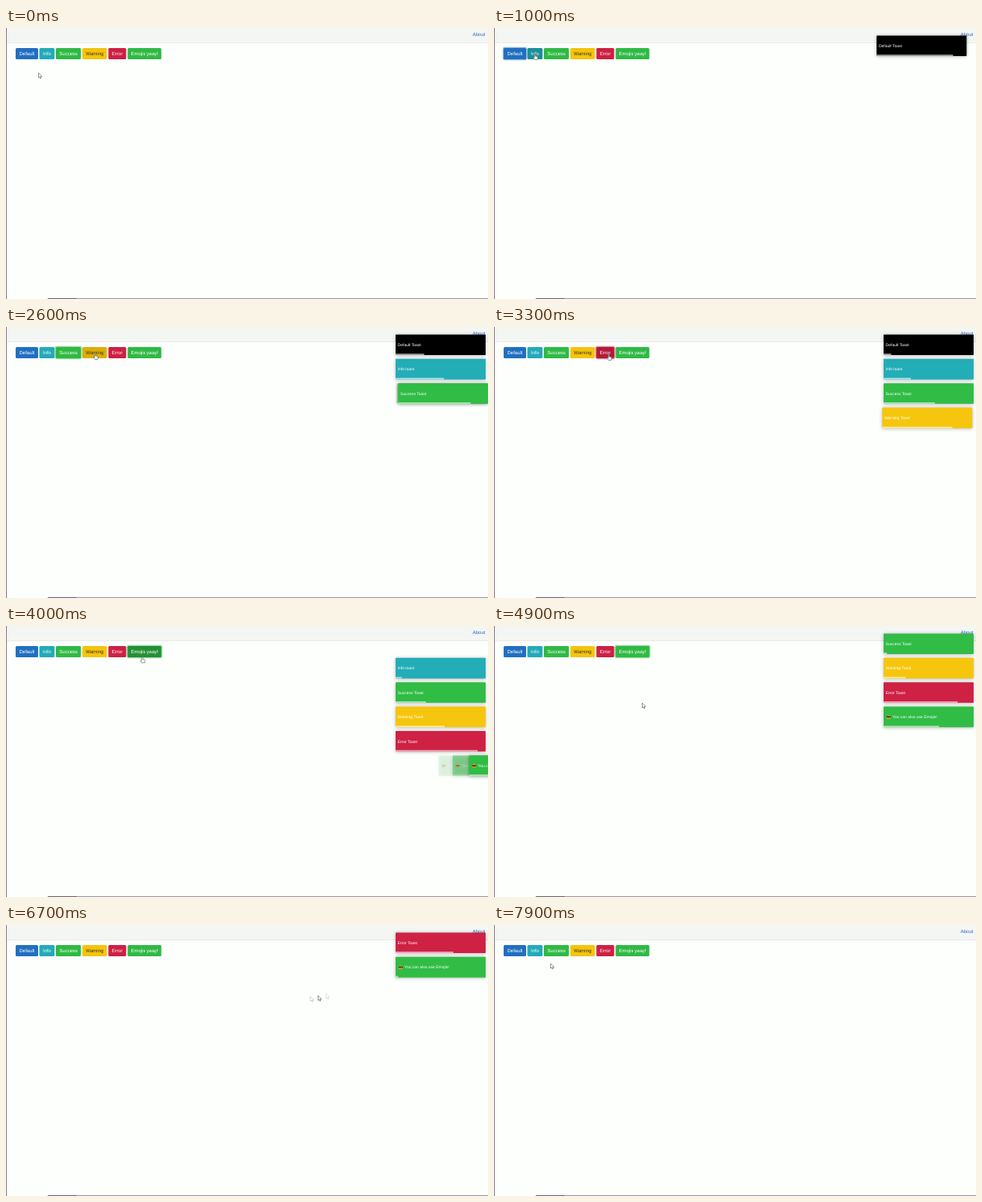
These frames come from a looping animation (600x338 px, 8 s). An HTML page with a canvas:

```html
<!DOCTYPE html>
<html lang="en">
<head>
<meta charset="utf-8">
<title>Toast demo</title>
<style>
  html, body { margin: 0; width: 100%; height: 100%; overflow: hidden; background: #fdfffd; }
  canvas { display: block; width: 600px; height: 338px; }
</style>
</head>
<body>
<canvas id="stage"></canvas>
<script>
const W = 600, H = 338, LOOP = 8000, STEP = 100;
const canvas = document.getElementById('stage');
const ctx = canvas.getContext('2d');
const dpr = window.devicePixelRatio || 1;
canvas.width = W * dpr;
canvas.height = H * dpr;

const FONT = '"Liberation Sans", Arial, sans-serif';
const ZOOM = 0.35;      // page pixels to stage pixels
const ANIM = 750;       // length of the bounce animations
const REMOVE = 550;     // delay before a closed toast frees its slot
const BLUR = 15;        // spacing of the blended exposures

const buttons = [
  { label: 'Default', x: 12, w: 28, color: '#216fc1', hover: '#1c5ea5', ring: '33,111,193' },
  { label: 'Info', x: 41.5, w: 19, color: '#23aab8', hover: '#1c8e9a', ring: '35,170,184' },
  { label: 'Success', x: 62, w: 31.3, color: '#30b944', hover: '#249036', ring: '48,185,68' },
  { label: 'Warning', x: 95, w: 30.6, color: '#f4c40c', hover: '#dcae08', ring: '244,196,12', ink: '#3b330f' },
  { label: 'Error', x: 127.4, w: 22.2, color: '#cd2044', hover: '#b31a3a', ring: '205,32,68' },
  { label: 'Emojis yaay!', x: 151.4, w: 42, color: '#30b944', hover: '#249036', ring: '48,185,68' }
];

// life = length of the progress bar, end = when the toast closes
const toasts = [
  { text: 'Default Toast', color: '#000', start: 550, life: 3000 },
  { text: 'Info toast', color: '#23adb7', start: 1210, life: 3000 },
  { text: 'Success Toast', color: '#30bc45', start: 2010, life: 3000 },
  { text: 'Warning Toast', color: '#f5c60d', start: 2635, life: 3000 },
  { text: 'Error Toast', color: '#ce2144', start: 3120, life: 10000, end: 7350 },
  { text: 'You can also use Emojis!', color: '#30bc45', start: 3725, life: 3065, face: true }
];
for (const toast of toasts) toast.end = toast.end || toast.start + toast.life;
const BLUR_CLICK = 5900;

// pointer path: time, x, y
const path = [
  [0, 40.5, 56], [350, 27, 33], [600, 27, 33], [1000, 51, 32], [1300, 51, 32],
  [1700, 76, 31], [2100, 76, 31], [2450, 111, 33], [2700, 111, 33], [3000, 143, 34],
  [3350, 143, 34], [3650, 169.5, 38.5], [4150, 169.5, 38.5], [4700, 184.5, 96], [6350, 184.5, 96],
  [6550, 290, 95], [6700, 388.5, 88], [6800, 450, 58], [7100, 541, 21],
  [7350, 541, 21], [7600, 320, 132], [7900, 70.5, 48], [8000, 70.5, 48]
];

const clamp = (v, a, b) => Math.min(b, Math.max(a, v));
const easeOut = p => 1 - Math.pow(1 - p, 3);

function slope(i, axis) {
  const a = path[i - 1], b = path[i], c = path[i + 1];
  if (!a || !c) return 0;
  const before = (b[axis] - a[axis]) / (b[0] - a[0]);
  const after = (c[axis] - b[axis]) / (c[0] - b[0]);
  return before * after > 0 ? 2 * before * after / (before + after) : 0;
}

function pointerAt(t) {
  t = clamp(t, 0, LOOP - 1);
  const i = path.findIndex(k => k[0] > t) - 1;
  const a = path[i], b = path[i + 1], span = b[0] - a[0];
  const p = (t - a[0]) / span, q = 1 - p;
  const along = axis =>
    a[axis] * (1 + 2 * p) * q * q + b[axis] * (3 - 2 * p) * p * p +
    span * p * q * (q * slope(i, axis) - p * slope(i + 1, axis));
  return { x: along(1), y: along(2) };
}

function segment(keys, p) {
  const i = Math.max(1, keys.findIndex(k => k[0] >= p));
  const [p0, v0] = keys[i - 1], [p1, v1] = keys[i];
  return v0 + (v1 - v0) * easeOut((p - p0) / (p1 - p0));
}

const BOUNCE_IN = [[0, 3000], [0.6, -25], [0.75, 10], [0.9, -5], [1, 0]];
const BOUNCE_OUT = [[0, 0], [0.2, -20], [1, 2000]];

function shift(toast, t) {
  const leaving = t >= toast.end;
  const p = clamp((t - (leaving ? toast.end : toast.start)) / ANIM, 0, 1);
  return segment(leaving ? BOUNCE_OUT : BOUNCE_IN, p) * ZOOM;
}

function box(x, y, w, h, r, fill) {
  ctx.fillStyle = fill;
  ctx.beginPath();
  ctx.roundRect(x, y, w, h, r);
  ctx.fill();
}

function write(text, x, y, size, color, align = 'left') {
  ctx.font = `${size}px ${FONT}`;
  ctx.textRendering = 'geometricPrecision';
  ctx.textAlign = align;
  ctx.textBaseline = 'alphabetic';
  ctx.fillStyle = color;
  ctx.fillText(text, x, y);
}

function drawPage() {
  box(0, 0, W, H, 0, '#fdfffd');
  box(0, 0, W, 18, 0, '#f4f6f4');
  box(0, 18, W, 0.8, 0, '#e2e4e2');
  write('About', 580.7, 10.3, 6, '#2a68c4');
  box(0, 0, 1, H, 0, '#857b8f');
  box(52, 337, W - 52, 1, 0, '#9d95a5');
  box(52, 337, 36, 1, 0, '#6c6078');
}

const inside = (p, x, y, w, h) => p.x >= x && p.x <= x + w && p.y >= y && p.y <= y + h;

function drawButton(b, hovered, focused) {
  if (focused) box(b.x - 1.2, 23.8, b.w + 2.4, 16.4, 2.4, `rgba(${b.ring},.5)`);
  box(b.x, 25, b.w, 14, 1.5, hovered ? b.hover : b.color);
  write(b.label, b.x + b.w / 2, 34.1, 6, b.ink || '#fff', 'center');
}

function drawFace(x, y) {
  ctx.fillStyle = '#e9a52c';
  ctx.beginPath();
  ctx.arc(x, y, 2.5, 0, Math.PI * 2);
  ctx.fill();
  box(x - 2.6, y - 1.2, 5.2, 1.5, 0.6, '#3a2416');
  box(x - 1.1, y + 0.9, 2.2, 0.7, 0.3, '#a2431f');
}

function drawToast(toast, t, x, y) {
  ctx.save();
  ctx.shadowColor = 'rgba(0,0,0,.3)';
  ctx.shadowBlur = 4 * dpr;
  ctx.shadowOffsetY = 0.5 * dpr;
  box(x, y, 112, 25.6, 0.4, toast.color);
  ctx.restore();
  if (toast.face) drawFace(x + 6.3, y + 13.2);
  write(toast.text, x + (toast.face ? 11 : 2.6), y + 14.5, 5, '#fff');
  const left = clamp(1 - (t - toast.start) / toast.life, 0, 1);
  box(x, y + 23.8, 112 * left, 1.8, 0, 'rgba(255,255,255,.62)');
}

function drawToasts(t) {
  const shown = toasts.filter(o => t >= o.start && t < o.end + REMOVE);
  shown.forEach((toast, slot) => {
    const y = 9.4 + slot * 30.4;
    const xs = [0, 1, 2].map(n => 485 + shift(toast, t - n * BLUR)).sort((a, b) => a - b);
    const moving = xs[2] - xs[0] > 1.5;
    const copies = moving ? [[xs[0], 0.12], [xs[1], 0.45], [xs[2], 1]] : [[xs[1], 1]];
    for (const [x, alpha] of copies) {
      if (x > W + 5) continue;
      ctx.globalAlpha = alpha;
      drawToast(toast, t, x, y);
    }
    ctx.globalAlpha = 1;
  });
  return shown.length;
}

const ARROW = new Path2D('M0 0V6.1L1.4 4.8L2.3 7L3.3 6.6L2.4 4.5H4.4Z');
const HAND = new Path2D('M-.7 .4Q0 -.4 .6 .4V3L2.9 3.5Q3.7 3.8 3.5 4.8L3 7.4H-.4L-2.2 4.9Q-2 3.9 -.7 4.7Z');

function drawPointer(p, hand, alpha) {
  ctx.save();
  ctx.globalAlpha = alpha;
  ctx.translate(p.x, p.y);
  ctx.fillStyle = '#fff';
  ctx.strokeStyle = '#4c4c50';
  ctx.lineWidth = 0.6;
  const shape = hand ? HAND : ARROW;
  ctx.fill(shape);
  ctx.stroke(shape);
  ctx.restore();
}

function draw(t) {
  ctx.setTransform(dpr, 0, 0, dpr, 0, 0);
  drawPage();

  const p = pointerAt(t);
  const clicked = t < BLUR_CLICK ? toasts.filter(o => t >= o.start).length - 1 : -1;
  let hand = false;
  buttons.forEach((b, i) => {
    const hovered = inside(p, b.x, 25, b.w, 14);
    hand = hand || hovered;
    drawButton(b, hovered, i === clicked);
  });

  const count = drawToasts(t);
  if (count && inside(p, 485, 9.4, 112, count * 30.4 - 5)) hand = true;

  const before = pointerAt(t - BLUR), after = pointerAt(t + BLUR);
  if (Math.hypot(after.x - before.x, after.y - before.y) > 8) {
    drawPointer(before, hand, 0.4);
    drawPointer(after, hand, 0.25);
  }
  drawPointer(p, hand, 1);
}

const begin = performance.now();
function tick() {
  const t = (performance.now() - begin) % LOOP;
  draw(Math.floor(t / STEP) * STEP);
  requestAnimationFrame(tick);
}
tick();
</script>
</body>
</html>
```
